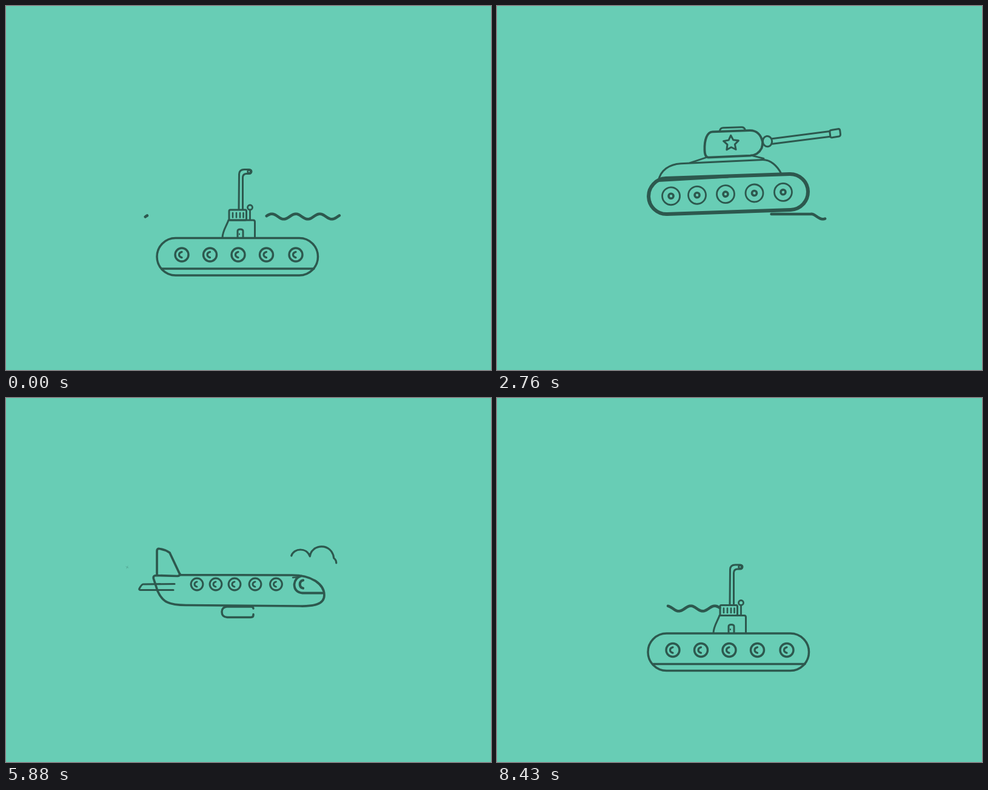
Animation, 800 px wide and 600 px high, one loop 8.46 s. Source, as an HTML page:

```html
<!DOCTYPE html>
<html lang="en">
<head>
<meta charset="utf-8">
<title>Vehicles</title>
<style>
  html, body { margin: 0; width: 100%; height: 100%; overflow: hidden; background: #68cdb5; }
  svg { display: block; width: 800px; height: 600px; }
  svg * { fill: none; stroke: #2d584e; stroke-linecap: round; stroke-linejoin: round; }
</style>
</head>
<body>
<svg id="stage" viewBox="0 0 800 600"></svg>
<script>
const LOOP = 8460;
const stage = document.getElementById('stage');
const parts = [];

const clamp = v => Math.max(0, Math.min(1, v));
const mix = (a, b, k) => a + (b - a) * k;
const ramp = (t, [a, b]) => clamp((t - a) / (b - a));

function keys(t, table, ease = k => (1 - Math.cos(Math.PI * k)) / 2) {
  for (let i = 1; i < table.length; i++) {
    const [t0, v0] = table[i - 1], [t1, v1] = table[i];
    if (t <= t1) return mix(v0, v1, ease(clamp((t - t0) / (t1 - t0))));
  }
  return table[table.length - 1][1];
}

function make(parent, tag, attrs = {}) {
  const el = document.createElementNS('http://www.w3.org/2000/svg', tag);
  for (const k in attrs) el.setAttribute(k, attrs[k]);
  parent.appendChild(el);
  return el;
}
const group = parent => make(parent, 'g');
const move = (el, value) => el.setAttribute('transform', value);
const ring = (parent, cx, cy, r, w) => make(parent, 'circle', { cx, cy, r, 'stroke-width': w });
const circle = (x, y, rx, ry = rx) =>
  `M${x - rx} ${y}a${rx} ${ry} 0 0 1 ${2 * rx} 0a${rx} ${ry} 0 0 1 ${-2 * rx} 0Z`;
const pill = (x, y, w, h, r) =>
  `M${x + w / 2} ${y}h${w / 2 - r}a${r} ${r} 0 0 1 ${r} ${r}v${h - 2 * r}a${r} ${r} 0 0 1 ${-r} ${r}` +
  `h${2 * r - w}a${r} ${r} 0 0 1 ${-r} ${-r}v${2 * r - h}a${r} ${r} 0 0 1 ${r} ${-r}Z`;

function star(x, y, r) {
  const pts = [];
  for (let i = 0; i < 10; i++) {
    const a = Math.PI * (i / 5 - 0.5), q = i % 2 ? r * 0.5 : r;
    pts.push(`${(x + q * Math.cos(a)).toFixed(1)} ${(y + q * Math.sin(a)).toFixed(1)}`);
  }
  return `M${pts.join('L')}Z`;
}

// A line that is drawn on during `on` and erased during `off`.
function line(parent, d, w, on, off, opt = {}) {
  const el = make(parent, 'path', { d, 'stroke-width': w, pathLength: 1 });
  parts.push(t => {
    const u = t < on[0] ? t + LOOP : t;
    const gone = ramp(u, off);
    const a = opt.back ? 0 : gone;
    const b = Math.min(ramp(u, on), opt.back ? 1 - gone : 1 - gone * (opt.tail || 0));
    trim(el, a, b);
  });
  return el;
}
function trim(el, a, b) {
  el.style.display = b - a > 0.002 ? '' : 'none';
  el.style.strokeDasharray = a <= 0 && b >= 1 ? 'none' : `${b - a} 3`;
  el.style.strokeDashoffset = -a;
}
// A group that grows and shrinks around (x, y).
function pop(parent, x, y, on, off, spin = 0) {
  const g = group(parent);
  parts.push(t => {
    const u = t < on[0] ? t + LOOP : t;
    const s = ramp(u, on) * (1 - ramp(u, off));
    g.style.display = s > 0.01 ? '' : 'none';
    move(g, `translate(${x} ${y}) rotate(${(t - 4650) * spin}) scale(${s})`);
  });
  return g;
}

// Submarine
const sub = group(stage);
{
  const on = [7480, 7800], off = [LOOP + 1180, LOOP + 1400];
  const add = (d, w = 3.5) => line(sub, d, w, on, off);
  add(pill(249, 382.5, 265.5, 61.5, 30.7));
  line(sub, 'M257 433H508', 3.3, on, [LOOP + 1450, LOOP + 1600]);
  add('M357 382C357 371 364 362 367 353H408Q410.5 353 410.5 356V382', 3);
  add(pill(368, 336, 28.5, 17, 2), 3);
  for (const x of [374, 380, 386, 391.5]) add(`M${x} 341V348.5`, 2.6);
  line(sub, 'M384 335L384.5 277Q385 269.5 393 269.5H401Q405 270 405 273Q404.5 276.5 401 276.5H396Q390.5 277 390.5 283V335',
    3, on, [LOOP + 1200, LOOP + 1710], { tail: 0.42 });
  add(circle(401, 273, 2.4), 2.6);
  add(circle(402.5, 332, 4), 2.8);
  add('M402.5 336V352', 2.8);
  add('M382 381V371Q382 368 386.5 368Q391 368 391 371V381', 3);
  add('M385 375.5V376.5', 2);
}

// Tank
const tank = group(stage), gun = group(tank);
{
  const on = [1200, 1450], off = [3500, 3750];
  const add = (d, w = 3, i = on) => line(tank, d, w, i, off, { back: true });
  add(pill(250, 284, 263, 59, 29.5), 6, [1380, 1625]);
  add('M470 283C464 270 453 259 440 259L305 260.5C286 261 271 270 267 288L382 285.5');
  add('M320 260L347 252M421 251L442 257', 2.8, [1400, 1560]);
  add('M441 230C439 218 432 210 420 210H359C350 210 345 223 345 240Q345 252 351 252L420 251.5Q433 251 439 240Q441 235 441 230', 3.8, [1200, 1462]);
  add('M371 209Q372 204 377 204H407Q412 204 413 209', 3);
  add(star(389, 230, 13), 3, [1200, 1475]);
  const arm = (d, i = on) => line(gun, d, 3, i, off, { back: true });
  arm(circle(449, 229, 7.6, 8.7));
  arm('M457 225.5L553 224.3');
  arm('M457 234L553 233');
  arm('M556 222.5Q553 222.5 553 225V232.5Q553 235 556 235L567 234.5Q570 234 570 231V225Q570 222 567 222Z', [1200, 1490]);
  [287, 330, 377, 424.5, 472].forEach((x, i) => {
    const t0 = 1340 + i * 40 + (i > 1 ? 50 : 0);
    const g = pop(tank, x, 313.5, [t0, t0 + 200], [3500 + i * 30, 3620 + i * 30]);
    ring(g, 0, 0, 14.5, 2.8);
    ring(g, 0, 0, 4, 3.6);
  });
}

// Helicopter
const heli = group(stage);
let blade;
{
  const on = [3560, 3900], off = [5530, 5840];
  const add = (d, w = 3.5) => line(heli, d, w, on, off);
  add('M286 291Q288 286 294 286H460C480 286 493 301 493 318C493 337 479 350.5 460 350.5L315 349.5C290 349 276 334 276 310', 3.8);
  add('M284 291.5L197 280.5M276 310L198 288');
  add(circle(195, 284, 4.2), 3.2);
  add('M249 286V258Q250 251 256 256L283 289');
  add(star(290, 305, 10.5), 2.8);
  add('M491 322H466Q462 322 462 318V297Q462 292.5 466 292.5H474Q483 294 489 303', 3.2);
  add('M468.5 297V316', 2.8);
  add(pill(347, 344, 57, 11, 4), 4);
  add('M350 284V281Q350 274 357 274H404Q411 275 412 284', 2.6);
  add('M368 273Q369 269 373 269H393Q397 269 398 273', 2.6);
  add('M376 268A7 7 0 0 1 390 268', 2.6);
  add('M379 268L391 258', 2.8);
  for (const x of [332, 418]) {
    add(`M${x - 5} 351V357M${x + 5} 351V357`, 3.2);
    const g = pop(heli, x, 366, on, off);
    ring(g, 0, 0, 9.6, 2.4);
    ring(g, 0, 0, 2.8, 2.8);
  }
  const tail = pop(heli, 200, 284, on, [5600, 5910], 0.7);
  make(tail, 'path', { d: 'M-10 -22.5L10 23.5M23.5 -10L-22.5 10.5', 'stroke-width': 2.6 });
  blade = make(heli, 'path', { 'stroke-width': 3.6 });
}

// Plane
const plane = group(stage), sky = group(stage);
{
  const on = [5540, 5840], off = [7450, 7720];
  const add = (d, w = 3.7) => line(plane, d, w, on, off);
  add('M287 291.5L472 292C506 292 525 308 525 325C525 340 508 343.5 485 343L300 341.5C268 342 258 336 250 318L243.5 298Q242 292.5 248 292.5L283 293.5Q287 293 287 290');
  add('M249 291V252Q249 248 253 248.5Q263 250 270 255L286 289');
  add('M522 321.5H489Q475.5 320 475.5 307Q477 296 487 293.5', 3.8);
  add('M473 296L484 295', 2.4);
  add('M490 300.5C483 302 483 312 490 313.5', 4.2);
  line(plane, 'M278 306.5L226 307Q224 307 220 314Q219 316.5 222 316.5H276', 3.2, on, [7260, 7469]);
  line(plane, 'M408 347Q408 344 404 344H364Q356 345 356 352.5Q356 361 365 361.5H404Q408 361.5 408 358Z', 3.4, [5640, 5900], [7200, 7420]);
  line(sky, 'M471 260C475 247 496 246 501.5 261C504 240 538 238 541 264Q545 267 545 272', 3.2, [5620, 5880], [7130, 7530]);
}

// Portholes
const holes = group(stage);
const subX = [290, 336.5, 383, 429.5, 478], airX = [315, 346, 377, 411, 445.5];
const ports = subX.map(() => {
  const g = group(holes);
  ring(g, 0, 0, 11, 3.4);
  make(g, 'path', { d: 'M0 -4.6C-6 -3 -6 3 0 4.6', 'stroke-width': 3.2 });
  return g;
});
function drawPorts(t) {
  ports.forEach((g, i) => {
    const t0 = 1300 + 40 * i + (i > 1 ? 80 : 0);
    const k = t < 2500 ? 0 : 1 - ramp(t, [7480, 7780]);
    const s = t < 2500 ? 1 - ramp(t, [t0, t0 + 80]) : ramp(t, [3600 + i * 30, 3780 + i * 30]);
    g.style.display = s > 0.01 ? '' : 'none';
    move(g, `translate(${mix(subX[i], airX[i], k)} 0) scale(${s * mix(1, 0.9, k)})`);
  });
}

// Water, which becomes the ground
const LEFT = 229, RIGHT = 551, SPAN = 323;
const water = make(stage, 'path', { 'stroke-width': 4.6 });
function drawWater(t) {
  const late = t > 7000;
  const lin = k => k;
  const start = late ? keys(t, [[7780, 500], [8430, 282]], lin)
    : keys(t, [[0, 430], [1440, 162], [2760, -193], [3330, -417]], lin);
  const len = late ? keys(t, [[7780, 0], [7950, 110], [8430, 86]], lin)
    : keys(t, [[0, 127], [1440, 105], [2760, 90], [3330, 0]], lin);
  const flat = late ? 0 : ramp(t, [950, 1400]);
  const yAt = x => {
    const wave = 347 - 4.3 * Math.cos(2 * Math.PI * (x - 478) / 39.6);
    return x > 518 ? wave : mix(wave, 346.5 - 3.5 * clamp((x - LEFT) / 200), flat);
  };
  let d = '', last = Infinity;
  for (let q = 0; len > 1 && q <= len; q += 1.5) {
    const x = LEFT + (((start + q - LEFT) % SPAN) + SPAN) % SPAN;
    if (x > RIGHT) continue;
    d += `${x < last && last !== Infinity || !d ? 'M' : 'L'}${x.toFixed(1)} ${yAt(x).toFixed(1)}`;
    last = x;
  }
  water.setAttribute('d', d);
}

// Bubbles left by the submarine
for (const [x, y] of [[315, 400], [352, 418], [484, 373]]) {
  ring(pop(stage, x, y, [980, 1120], [1180, 1480]), 0, 0, 5, 3);
}

// Height of the porthole row
const height = [[0, 410], [150, 398], [480, 490], [870, 438], [1440, 311], [1600, 309], [2000, 313],
  [2760, 307.5], [3200, 311], [3480, 334], [3720, 316], [4000, 303], [4300, 322], [4650, 312],
  [4950, 302], [5250, 319], [5880, 307], [6400, 324], [6900, 305], [7440, 340], [7830, 404],
  [8000, 432], [8220, 398], [8430, 415.5]];
const tilt = [[1440, 0], [1800, 1.5], [2250, -1], [2760, -2], [3150, 1], [3450, 0]];
const aim = [[1500, 0], [2150, -14], [2450, 2], [2760, -4.6], [3200, 0]];

function drawBlade(t) {
  const show = ramp(t, [3850, 3950]) * (1 - ramp(t, [5500, 5600]));
  const k = (((t - 4650) / 300 + 0.86) % 1 + 1) % 1;
  const x = 545 - 320 * k, half = (10 + 35 * Math.sin(Math.PI * k)) * 0.5;
  blade.style.display = show > 0 ? '' : 'none';
  const a = Math.max(225, x - half * show), b = Math.min(545, x + half * show);
  blade.setAttribute('d', `M${a} 262.5H${b}`);
}

function draw(t) {
  const y = keys(t, height);
  move(sub, `translate(0 ${y - 410})`);
  move(tank, `translate(0 ${y - 311}) rotate(${keys(t, tilt)} 381 313)`);
  move(gun, `rotate(${keys(t, aim)} 449 229)`);
  move(heli, `translate(0 ${y - 312})`);
  move(plane, `translate(0 ${y - 307})`);
  move(holes, `translate(0 ${y})`);
  move(sky, `translate(${-0.196 * Math.max(0, t - 5880)} ${17 * ramp(t, [6900, 7440])})`);
  for (const part of parts) part(t);
  drawPorts(t);
  drawBlade(t);
  drawWater(t);
}

const begin = performance.now();
function tick() {
  draw((performance.now() - begin) % LOOP);
  requestAnimationFrame(tick);
}
draw(0);
requestAnimationFrame(tick);
</script>
</body>
</html>
```
